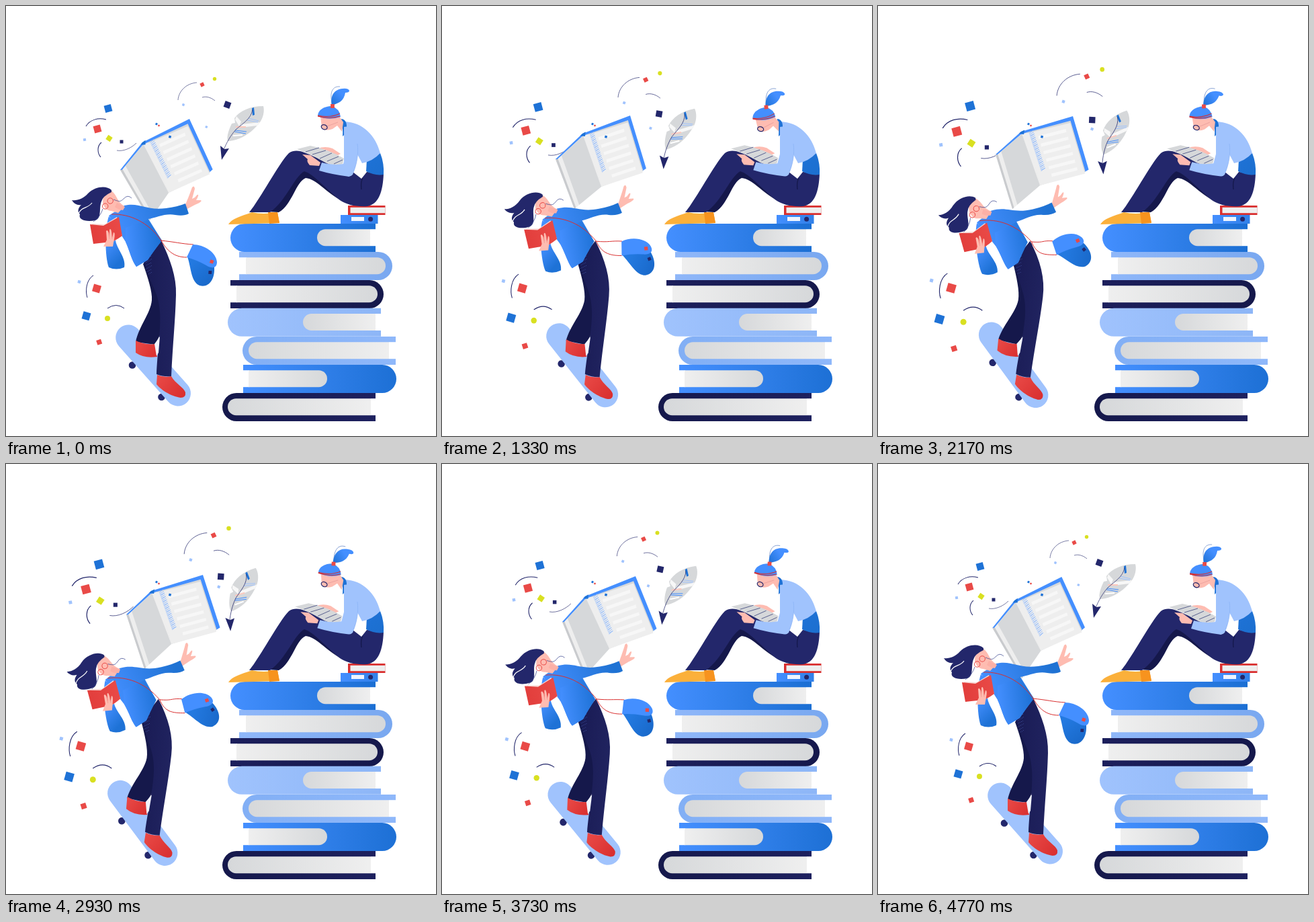
Write an HTML page with a canvas that moves like this. It is 640x640 px and loops after 4.81 s.

```html
<!DOCTYPE html>
<html lang="en">
<head>
<meta charset="utf-8">
<title>Readers</title>
<style>
html, body { margin: 0; width: 100%; height: 100%; overflow: hidden; background: #fff; }
canvas { display: block; width: 100vw; height: 100vh; }
</style>
</head>
<body>
<canvas id="stage" width="640" height="640"></canvas>
<script>
const ctx = document.getElementById('stage').getContext('2d');
const LOOP = 4810;
const TIMES = [0, 770, 1330, 2170, 2930, 3730];
const BLUE = '#448fff', DEEP = '#1e72d6', SKY = '#a0c3fd', NAVY = '#23276b', DARK = '#15184b';
const RED = '#e94a47', CRIMSON = '#d92f2f', LIME = '#d9e021', SKIN = '#febcb1', GREY = '#d6d8da', PAPER = '#eeeeee';

function grad(x0, y0, x1, y1, a, b) {
  const g = ctx.createLinearGradient(x0, y0, x1, y1);
  g.addColorStop(0, a);
  g.addColorStop(1, b);
  return g;
}
function fill(d, color) {
  ctx.fillStyle = color;
  ctx.fill(new Path2D(d));
}
function line(d, color, width = 1) {
  ctx.strokeStyle = color;
  ctx.lineWidth = width;
  ctx.stroke(new Path2D(d));
}
function poly(points, color) {
  ctx.beginPath();
  for (const p of points) ctx.lineTo(p[0], p[1]);
  ctx.closePath();
  ctx.fillStyle = color;
  ctx.fill();
}
function dot(x, y, r, color) {
  ctx.beginPath();
  ctx.arc(x, y, r, 0, 7);
  ctx.fillStyle = color;
  ctx.fill();
}
function ring(x, y, r, color, width = 1) {
  ctx.beginPath();
  ctx.arc(x, y, r, 0, 7);
  ctx.strokeStyle = color;
  ctx.lineWidth = width;
  ctx.stroke();
}
function square(x, y, size, deg, color) {
  group(() => {
    ctx.translate(x, y);
    ctx.rotate(deg * Math.PI / 180);
    ctx.fillStyle = color;
    ctx.fillRect(-size / 2, -size / 2, size, size);
  });
}
function group(draw) {
  ctx.save();
  draw();
  ctx.restore();
}
function turn(x, y, deg) {
  ctx.translate(x, y);
  ctx.rotate(deg * Math.PI / 180);
  ctx.translate(-x, -y);
}
function scaleAt(x, y, s) {
  ctx.translate(x, y);
  ctx.scale(s, s);
  ctx.translate(-x, -y);
}
function turned(x, y, cx, cy, deg) {
  const a = deg * Math.PI / 180, c = Math.cos(a), s = Math.sin(a);
  return [cx + (x - cx) * c - (y - cy) * s, cy + (x - cx) * s + (y - cy) * c];
}

// Smooth periodic curve through values at TIMES.
function track(t, values) {
  const n = TIMES.length;
  const time = i => TIMES[(i + n) % n] + LOOP * Math.floor(i / n);
  const val = i => values[(i + n) % n];
  const slope = i => (val(i + 1) - val(i - 1)) / (time(i + 1) - time(i - 1));
  let i = n - 1;
  while (TIMES[i] > t) i--;
  const h = time(i + 1) - time(i), u = (t - time(i)) / h, v = 1 - u;
  return v * v * (1 + 2 * u) * val(i) + u * u * (3 - 2 * u) * val(i + 1)
    + h * u * v * (v * slope(i) - u * slope(i + 1));
}

function confetti(p) {
  group(() => {
    scaleAt(214, 167, 1 + .246 * p);
    square(152, 152.5, 10.5, -15, DEEP);
    square(136, 183, 10.5, -15, RED);
    square(153.5, 197, 7.5, 33, LIME);
    square(172, 202, 5, 0, NAVY);
    square(117, 199, 4, -10, SKY);
    square(292, 117, 5.5, -25, RED);
    dot(310.5, 108.5, 2.7, LIME);
    square(264, 147, 3.4, 20, SKY);
    square(298.3, 180, 3.3, 20, SKY);
    line('M119 179C125 169 137 166 149 169M142 203C135 209 136 219 141 225', NAVY, 1);
    line('M165 215C175 217 187 211 194 204', NAVY, .6);
    line('M256 140C257 126 269 115 284 114M292 136C298 134 305 136 311 141', NAVY, .6);
  });
  group(() => {
    scaleAt(335, 425, 1 + .133 * p);
    square(109, 410.5, 4.4, 15, SKY);
    square(135, 420.5, 11.3, 16, RED);
    square(119.5, 461.3, 11.3, 16, DEEP);
    dot(151, 465, 4, LIME);
    square(138.7, 500.2, 7.2, -18, RED);
    line('M130 401C119 408 118 425 121 434M151 450Q164 441 176 450', NAVY, 1);
  });
}

function feather(p) {
  group(() => {
    ctx.translate(-11 * p, 23.2 * p);
    turn(329.5, 147, -18 * p);
    square(329.5, 147, 9.3, 20, NAVY);
    fill('M330 201C328 194 332 183 336 175L341 174L340 167C348 156 363 149 383 149C385 156 383 166 378 173C370 183 360 192 348 197Q338 201 330 201Z', GREY);
    fill('M343 164L350 172L347 179L341 169ZM350 176L378 173L374 178L349 181Z', '#f7f7f7');
    line('M342 180L357 180', '#fcc8bd', 2);
    line('M340 187L357 190M341 185L358 187', BLUE, 1);
    line('M361 167L376 171M359 170L375 173', SKY, 1);
    line('M338 193L352 192', '#fff', 2);
    fill('M366 152L369 151L370 162L367 163Z', DEEP);
    line('M367 154C365 168 352 175 342 184C334 193 328 204 324 214', NAVY, .7);
    fill('M319 208L325 213L332 212L321 229Z', NAVY);
  });
}

function openBook(t) {
  const at = (xs, ys) => [track(t, xs), track(t, ys)];
  const P = at([203, 201, 209, 213, 216, 213], [203, 196, 190, 187, 189, 197]);
  const Q = at([273, 273, 280, 290, 293, 288], [168, 165, 163, 164, 165, 167]);
  const D = at([242, 238, 237, 241, 246, 249], [278, 274, 269, 267, 268, 275]);
  const L = at([170, 166, 169, 175, 179, 179], [244, 237, 228, 221, 224, 235]);
  const M = at([214, 204, 197, 200, 206, 212], [319, 306, 302, 302, 305, 316]);
  const mix = (a, b, k) => [a[0] + (b[0] - a[0]) * k, a[1] + (b[1] - a[1]) * k];
  const page = (u, v) => [0, 1].map(i => P[i] + u * (Q[i] - P[i]) + v * (D[i] - P[i]));
  const leaf = (u, v) => mix(mix(L, P, u), mix(M, D, u), v);

  poly([P, Q, page(.95, .98), page(.86, 1)], BLUE);
  poly([page(.05, .04), page(.93, .065), page(.88, 1), D], GREY);
  poly([page(.085, .055), page(.91, .1), page(.86, 1.03), D], PAPER);
  for (let i = 0; i < 6; i++) {
    const v = .16 + i * .14;
    poly([page(.27, v), page(.8 - i * .008, v + .02), page(.79 - i * .008, v + .075), page(.26, v + .055)], '#f7f7f7');
  }
  ctx.beginPath();
  for (let i = 0; i < 34; i++) {
    const v = .04 + i * .021;
    ctx.moveTo(...page(.13 - v * .03, v + .03));
    ctx.lineTo(...page(.22 - v * .03, v + (i % 3) * .012));
  }
  ctx.strokeStyle = '#8fb9fc';
  ctx.lineWidth = .9;
  ctx.stroke();

  poly([L, P, page(.1, .05), D, M], PAPER);
  poly([leaf(.2, .03), leaf(1, .04), D, leaf(.18, 1)], GREY);
  poly([L, leaf(.07, .015), leaf(.06, 1), M], '#c9cbce');
  poly([L, P, page(.1, .04), leaf(.96, .035), leaf(.05, .025)], BLUE);
  poly([leaf(.92, 0), P, page(.07, -.01), page(.03, .06)], DEEP);
  square(224, 175.7, 3, 20, DEEP);
  square(227.5, 178, 2.4, 20, RED);
  square(244, 194.7, 3.5, 15, DEEP);
}

function ridingLegs(p) {
  group(() => {
    turn(218, 352, 5.6 * p);
    dot(188, 534.5, 5.3, NAVY);
    dot(231.5, 582, 5.3, NAVY);
    ctx.lineCap = 'round';
    line('M182.2 493.5L256 576.5', SKY, 38);
    fill('M204 384C211 404 218 425 217 438C215 458 198 476 193 500L222 504L234 480L240 400L229 352Z', DARK);
    fill('M193 498Q207 505 224 503L225 522Q206 525 193 516Z', grad(193, 500, 225, 520, RED, CRIMSON));
    fill('M225 549Q235 553 246 551C252 562 265 568 267 575Q268 583 260 583C245 581 229 570 224 563Z', grad(225, 550, 265, 580, RED, CRIMSON));
    fill(`M205 382L${231 - 5 * p} 349C244 376 254 403 253 430C252 469 248 505 246 551Q234 552 224 548C225 518 231 480 229 455C227 425 217 420 210 392Z`,
      grad(205, 400, 252, 400, '#191b54', '#20235f'));
    fill('M221 503L229 492L227 516L224 521Z', '#f3f5ff');
    ctx.fillStyle = '#4c63b8';
    for (let i = 0; i < 26; i++) ctx.fillRect(208 + (i * 7) % 9, 371 + i * 1.1, .8, .8);
  });
}

function upperPose(p) {
  ctx.translate(-2.5 * p, 2 * p);
  turn(230, 350, -6.1 * p);
}

function riderBody(p) {
  const hem = `${232 - 7 * p} 349Q${218 - 4 * p} 367 ${211 - 3 * p} 378L${194 - 2 * p} ${388 - 2 * p}`;
  group(() => {
    upperPose(p);
    fill('M265 301C268 293 274 279 277 270Q280 266 281 272L277 287L281 285C287 277 288 281 283 289L290 289Q293 291 281 296L268 303Z', SKIN);
    fill(`M153 312L176 297C200 292 208 305 238 301Q255 299 267 294L272 309Q265 313 252 311C237 308 224 315 212 317L${hem}C187 379 184 364 178 351Z`,
      grad(165, 345, 262, 312, BLUE, '#1f72d3'));
    fill(`M178 330L211 318L${hem}C187 379 184 364 178 351Z`, grad(178, 355, 229, 350, BLUE, DEEP));
    fill('M153 313C147 330 147 373 153 389Q164 394 176 389C179 374 164 361 163 348L174 334Z', grad(151, 350, 175, 375, BLUE, DEEP));
    group(() => {
      turn(172, 300, -5 * p);
      fill('M145 280L157 275C166 282 164 290 176 298L167 308L157 305C150 305 146 300 144 293Z', SKIN);
      fill('M165 293L177 299L174 304Q166 303 162 299Z', '#fcb0a6');
      fill('M157 274C150 267 133 268 122 279C115 287 106 290 98 289C101 294 106 297 112 296C107 301 106 306 110 310C107 318 119 322 133 319C143 316 138 300 142 291Q144 283 157 277Z', NAVY);
      line('M108 309C113 298 121 302 128 293', '#fff', 1.2);
      ring(147.7, 298, 4.2, RED);
      ring(155.2, 290, 4.2, RED);
      line('M160 288C168 291 170 292 175 287Q181 280 187 286M144 302Q141 313 130 321', '#36428d', .7);
    });
    fill('M128 324L147 325L165 314L173 342L157 352L130 353Z', '#f7d7d4');
    fill('M125 325L145 327L168 314L173 342Q162 350 156 351L130 354Z', grad(127, 340, 173, 330, '#e23e3c', RED));
    fill('M145 358L150 348L149 335Q151 332 153 338L154 345L154 333Q156 330 157 336L158 345L160 337Q163 336 161 347L159 358Z', SKIN);
    line('M153 338L154 347M157 336L158 347', '#f08c83', .6);
  });
}

function bagAndStrap(p) {
  const pose = (x, y) => {
    const q = turned(x, y, 230, 350, -6.1 * p);
    return [q[0] - 2.5 * p, q[1] + 2 * p];
  };
  const bag = (x, y) => turned(x, y, 263, 376, -45 * p);
  const a = bag(279, 355), b = bag(269, 374), n = pose(157, 310), w = pose(231, 349);
  ctx.beginPath();
  ctx.moveTo(...n);
  ctx.bezierCurveTo(...pose(185, 309), ...pose(212, 322), ...w);
  ctx.bezierCurveTo(w[0] + 8, w[1] + 14 + 5 * p, b[0] - 20, b[1], ...b);
  ctx.moveTo(w[0] - 1, w[1]);
  ctx.bezierCurveTo(w[0] + 20, w[1] + 2, a[0] - 18, a[1] - 1, ...a);
  ctx.strokeStyle = CRIMSON;
  ctx.lineWidth = 1;
  ctx.stroke();
  group(() => {
    turn(263, 376, -45 * p);
    fill('M270 373C276 391 275 410 288 416C302 420 311 407 310 389L300 370Z', grad(280, 380, 305, 412, '#2379e0', '#1969ca'));
    fill('M269 374L278 355C295 355 313 367 314 381C314 391 306 391 298 386Q284 378 269 374Z', BLUE);
    square(306.2, 380.5, 5.2, 20, RED);
    square(303.8, 396.5, 4.8, 5, NAVY);
  });
}

// Spine is rounded on the left, or on the right when flipped.
function stackBook(y, left, right, pageLeft, pageRight, flip, c0, c1) {
  const round = (x0, y0, x1, y1, r) => {
    ctx.beginPath();
    ctx.roundRect(x0, y0, x1 - x0, y1 - y0, flip ? [0, r, r, 0] : [r, 0, 0, r]);
    ctx.fill();
  };
  ctx.fillStyle = grad(left, 0, right, 0, c0, c1);
  round(left, y, right, y + 42, 21);
  ctx.fillStyle = '#fff';
  if (flip) ctx.fillRect(left - 1, y + 8.2, pageLeft - left + 2, 25);
  else ctx.fillRect(pageRight, y + 8.2, right - pageRight + 1, 25);
  ctx.fillStyle = flip ? grad(pageLeft, 0, pageRight, 0, '#efefef', GREY) : grad(pageLeft, 0, pageRight, 0, GREY, '#efefef');
  round(pageLeft, y + 8.2, pageRight, y + 33.2, 12.5);
}

function stack() {
  stackBook(324, 334, 550, 463, 542, false, BLUE, '#1b6fd3');
  stackBook(366, 347, 575, 357, 565, true, '#8fb7f9', '#79a8f0');
  stackBook(408, 334, 562, 343, 553, true, '#1c1f5c', DARK);
  stackBook(449.8, 330, 558, 442, 550, false, SKY, '#8db6f7');
  stackBook(492, 352, 580, 361, 570, false, '#82aff5', '#8fb8fa');
  stackBook(534, 353, 581, 361, 478, true, BLUE, '#1d70d5');
  stackBook(576, 322, 550, 330, 543, false, DARK, '#1e215f');
  ctx.fillStyle = grad(498, 0, 554, 0, BLUE, '#3180e8');
  ctx.fillRect(498, 311, 55.5, 13);
  ctx.fillStyle = '#eef4ff';
  ctx.fillRect(514, 314, 19, 6);
  dot(542.6, 317.2, 3.5, NAVY);
  ctx.fillStyle = CRIMSON;
  ctx.fillRect(509, 297, 55.5, 14);
  ctx.fillStyle = PAPER;
  ctx.fillRect(512.5, 299.8, 52, 8.4);
}

function girlBody() {
  fill('M331 325C336 316 350 313 366 307Q382 311 404 307L407 323Z', '#fbb03b');
  fill('M390 307L404 307L407 323L392 324Z', '#f7931e');
  fill('M390 306C408 287 414 270 431 250Q440 239 460 250L512 283L500 290C475 277 462 257 446 256C431 262 426 296 406 307Z', DARK);
  fill('M362 307C378 288 406 234 421 219C433 211 446 219 458 224L511 243L529 257L537 247L562 249C561 278 554 295 538 298C520 299 508 296 497 289C471 267 457 250 444 246C429 254 417 290 393 307Z', NAVY);
  line('M529 273C528 263 529 260 531 256', DARK, 1.3);
  fill('M537 229L557 219Q563 234 562 251Q549 253 536 246Z', grad(538, 225, 562, 250, DEEP, '#1c6fcf'));
  fill('M503 172C532 173 550 193 557 219Q546 231 530 234L521 217L505 214Z', SKY);
  fill('M499 168Q510 169 506 189L501 194Q502 181 499 178Z', DEEP);
}

function girlArms(k) {
  group(() => {
    ctx.translate(-2.7 * k, -.8 * k);
    fill('M464 212Q475 208 486 212L498 220L488 225L470 217Z', SKIN);
    fill('M433 213L453 208Q480 213 503 227L501 235Q488 240 477 234L455 222Z', GREY);
    line('M446 217L466 211M456 221L476 215M467 227L485 219M478 231L495 224M488 235L501 229', '#39427a', .8);
    fill('M441 221L453 222L468 233L466 238L452 237Q447 231 449 228Z', SKIN);
    fill('M470 233Q487 238 502 235L506 220L522 220L518 244L511 254Q486 251 466 245Z', SKY);
  });
  fill('M503 180Q516 176 523 198C526 216 522 237 516 251Q511 256 504 251L503 232Z', SKY);
  line('M523 205C525 220 522 236 517 247', '#8cb4f7', .8);
}

function girlHead(t) {
  const tilt = track(t, [0, -7, -7, -2, 3, 3]);
  const tail = track(t, [0, 6, 7.5, 11.5, 14, 9.5]);
  group(() => {
    turn(497, 178, tilt);
    fill('M468 164L470 181Q475 187 486 183L493 178L500 187L502 173L496 164Z', SKIN);
    fill('M464 164C464 154 475 149 485 149Q497 153 498 165Q481 171 464 164Z', BLUE);
    line('M464 163Q482 167 497 160M464 164Q481 169 497 164', CRIMSON, 1.1);
    dot(497, 174, 4, SKIN);
    ctx.beginPath();
    ctx.ellipse(473.7, 180.3, 4.6, 3.4, .4, 0, 7);
    ctx.strokeStyle = NAVY;
    ctx.lineWidth = 1.2;
    ctx.stroke();
    line('M478 179L494 173', '#df9292', .6);
    group(() => {
      turn(486, 149, tail - tilt);
      line('M485 143C482 130 485 119 497 120', '#5f83c5', .7);
      fill('M485 149C482 134 488 124 501 123Q509 122 511 126Q511 129 505 129C503 141 496 144 488 147Z', grad(485, 147, 500, 132, DEEP, BLUE));
    });
    square(486, 149, 5.8, 0, RED);
  });
}

function draw(t) {
  const p = (1 - Math.cos(2 * Math.PI * t / LOOP)) / 2;
  ctx.fillStyle = '#fff';
  ctx.fillRect(0, 0, 640, 640);
  confetti(p);
  openBook(t);
  feather(p);
  ridingLegs(p);
  riderBody(p);
  bagAndStrap(p);
  stack();
  girlBody();
  girlHead(t);
  girlArms(track(t, [0, .95, 1, 1, 1, .9]));
}

const start = performance.now();
function frame() {
  draw((performance.now() - start) % LOOP);
  requestAnimationFrame(frame);
}
frame();
</script>
</body>
</html>
```
